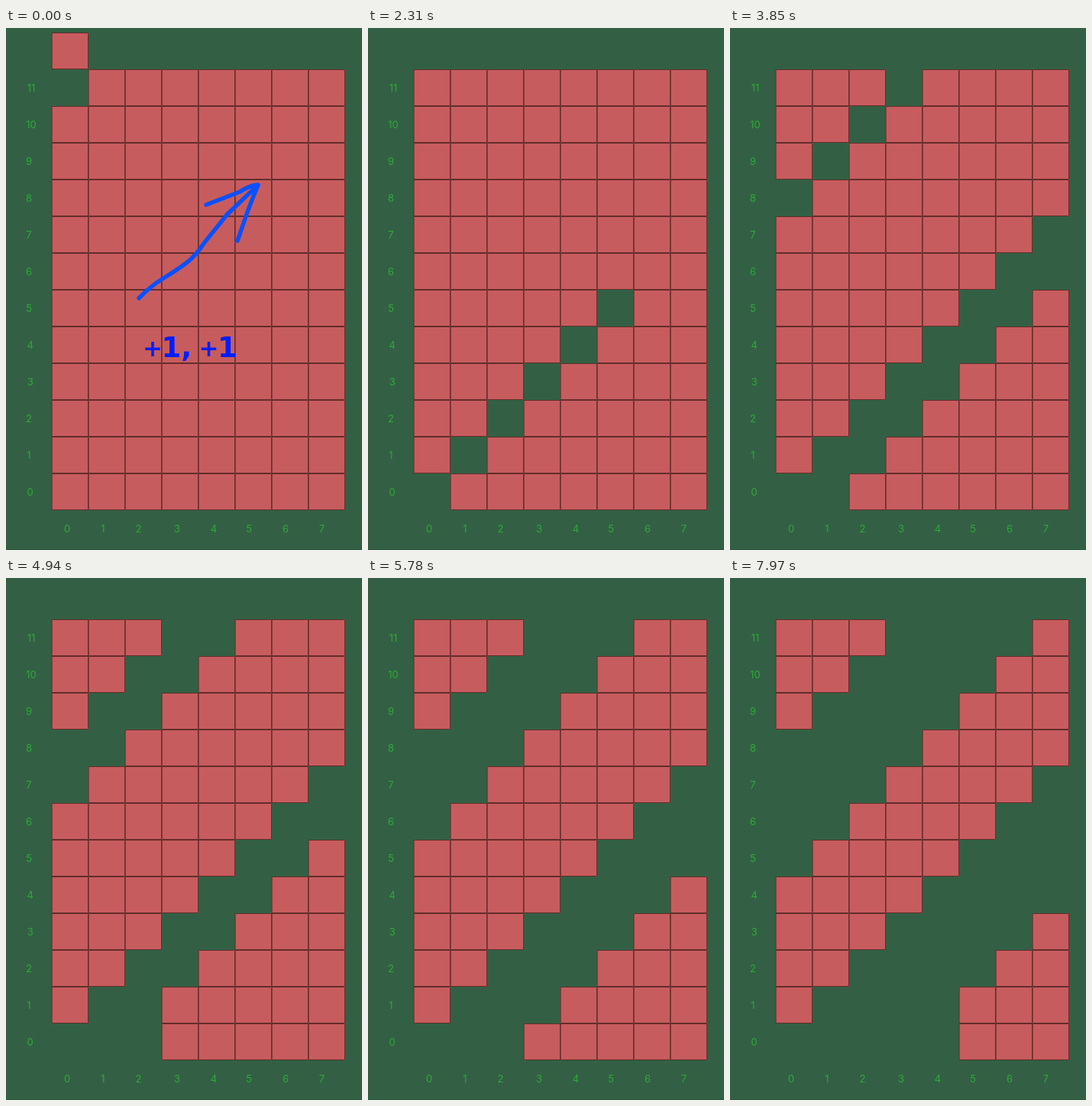
Write an HTML page with a canvas that moves like this. It is 466 px wide and 682 px high and loops after 8000 ms.

```html
<!DOCTYPE html>
<html lang="en">
<head>
<meta charset="utf-8">
<title>Diagonal walk on a grid</title>
<style>
  html, body { margin: 0; width: 466px; height: 682px; overflow: hidden; background: #336044; }
  canvas { display: block; }
</style>
</head>
<body>
<canvas id="stage" width="466" height="682"></canvas>
<script>
const ctx = document.getElementById('stage').getContext('2d');
const COLS = 8, ROWS = 12, CELL = 48, LEFT = 60, BOTTOM = 630, LOOP = 8000;
const FADE_START = 1460, FADE_STEP = 77, FADE_STEPS = 6;
const LABEL_X = [80, 127, 173.5, 224, 272, 318, 366, 413.5];

// Start and end of each diagonal pass, in ms
const PASSES = [[1920, 2770], [3380, 4240], [4940, 5780], [6410, 7270], [7970, 8830]];

function clearTime(pass, row) {
  // The second pass stutters: its first four cells vanish in pairs
  if (pass === 1 && row < 4) return 3470 + 150 * (row >> 1);
  const [start, end] = PASSES[pass];
  return start + (end - start) * row / (ROWS - 1);
}

function isCleared(col, row, t) {
  const pass = (col - row + 2 * COLS) % COLS;
  return pass < PASSES.length && t >= clearTime(pass, row);
}

function tile(col, row, alpha = 1) {
  const x = LEFT + col * CELL, y = BOTTOM - (row + 1) * CELL;
  ctx.globalAlpha = alpha;
  ctx.fillStyle = '#c75c5e';
  ctx.fillRect(x, y, CELL, CELL);
  ctx.strokeStyle = '#632d2a';
  ctx.lineWidth = 1;
  ctx.strokeRect(x + 0.5, y + 0.5, CELL - 1, CELL - 1);
  ctx.globalAlpha = 1;
}

function labels() {
  ctx.fillStyle = '#2dab37';
  ctx.font = '13px Inter, sans-serif';
  ctx.textAlign = 'center';
  for (let row = 0; row < ROWS; row++) {
    const x = row > 9 ? 33 : [0, 3, 4].includes(row) ? 31.7 : 30;
    ctx.fillText(row, x, BOTTOM - row * CELL - 19.5);
  }
  LABEL_X.forEach((x, col) => ctx.fillText(col, x, 658.5));
}

function note(alpha) {
  ctx.globalAlpha = alpha;
  ctx.strokeStyle = '#0a50ff';
  ctx.lineWidth = 5.5;
  ctx.lineCap = ctx.lineJoin = 'round';
  ctx.stroke(new Path2D(
    'M174 353 Q188 338 206 327 T236 307 Q248 298 260 280 L290 243 L330 205' +
    ' Q320 205 306 214 L262 231 M330 205 Q318 234 312 252 L303 278'));
  ctx.fillStyle = '#001eff';
  ctx.textAlign = 'left';
  const write = (text, x, y, size) => {
    ctx.font = `bold ${size}px "DejaVu Sans", sans-serif`;
    ctx.fillText(text, x, y);
  };
  write('+', 179, 429, 31);
  write('1,', 203.5, 430, 37);
  write('+', 252.5, 429, 31);
  write('1', 277, 430, 37);
  ctx.globalAlpha = 1;
}

function draw(t) {
  ctx.fillStyle = '#336044';
  ctx.fillRect(0, 0, 466, 682);
  ctx.fillStyle = '#2e573e';
  ctx.fillRect(0, 681, 466, 1);

  const step = Math.floor((t - FADE_START) / FADE_STEP) + 1;
  const intro = 1 - Math.min(Math.max(step / FADE_STEPS, 0), 1);
  for (let row = 0; row < ROWS; row++)
    for (let col = 0; col < COLS; col++)
      if (!isCleared(col, row, t))
        tile(col, row, col === 0 && row === ROWS - 1 ? 1 - intro : 1);
  labels();
  if (intro > 0) {
    tile(0, ROWS, intro);
    note(intro);
  }
}

function frame() {
  draw(performance.now() % LOOP);
  requestAnimationFrame(frame);
}
frame();
</script>
</body>
</html>
```
